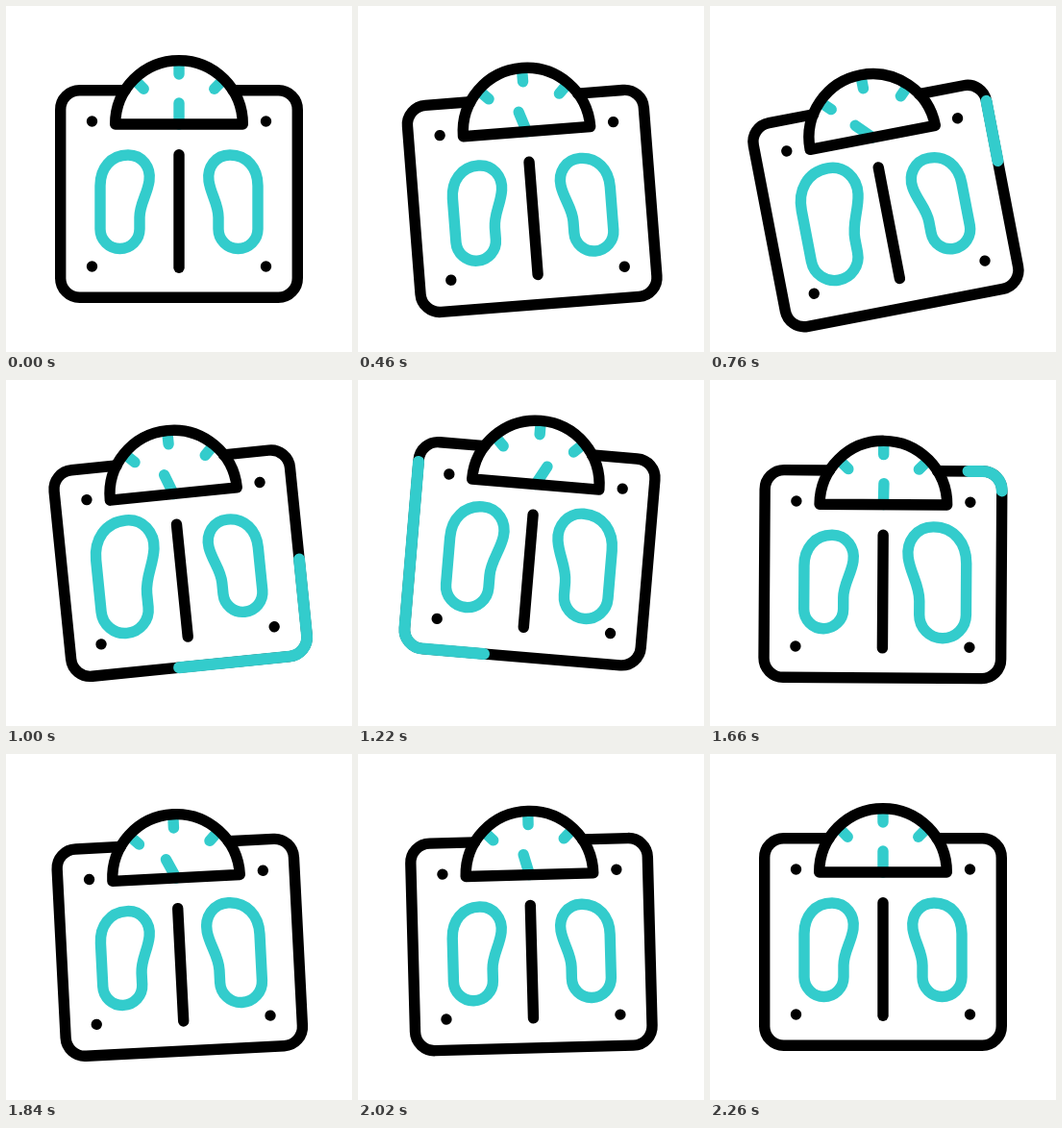
Animation of 360 by 360 pixels, one loop 2400 ms. Source, as an HTML page:

```html
<!DOCTYPE html>
<html lang="en">
<head>
<meta charset="utf-8">
<title>Bathroom scale</title>
<style>
  html, body { margin: 0; width: 100%; height: 100%; overflow: hidden; background: #fff; }
  svg { display: block; width: 100vw; height: 100vh; }
  path { fill: none; stroke: #000; stroke-width: 11.4; stroke-linecap: round; stroke-linejoin: round; }
  .teal { stroke: #3cc; }
  #left, #right { stroke-width: 11.4; }
  #foot { stroke: #3cc; stroke-width: inherit; }
  #sweep { stroke-width: 12; }
</style>
</head>
<body>
<svg viewBox="0 0 360 360">
  <defs>
    <path id="foot" d="M98 187C98 169 109 155 127 155C142 155 151 168 149 182C147 196 139 206 139 220V232A20.5 20.5 0 0 1 98 232Z"/>
    <path id="mark" class="teal" d="M180 63V71"/>
  </defs>
  <g id="scale">
    <use href="#mark"/>
    <use href="#mark" transform="rotate(-45 180 123)"/>
    <use href="#mark" transform="rotate(45 180 123)"/>
    <path class="teal" id="needle" d="M180 123V101"/>
    <path id="body"/>
    <path d="M113.7 123A66.3 66.3 0 0 1 246.3 123Z"/>
    <path d="M180 154.7V272.3"/>
    <path d="M89.5 120h0m181 0h0m0 151h0m-181 0h0"/>
    <g id="left"><use href="#foot"/></g>
    <g id="right"><use href="#foot" transform="translate(360 0) scale(-1 1)"/></g>
    <path class="teal" id="sweep"/>
  </g>
</svg>
<script>
  const LOOP = 2400, START = 200, END = 2250;
  const el = id => document.getElementById(id);
  const place = (id, value) => el(id).setAttribute("transform", value);

  // Smooth rise from 0 to 1 between two times.
  function ramp(t, from, to) {
    const p = Math.min(1, Math.max(0, (t - from) / (to - from)));
    return p * p * (3 - 2 * p);
  }

  // Sways out from rest through three peaks and back.
  function swing(t, times, peaks) {
    const stops = [START, ...times, END], values = [0, ...peaks, 0];
    return peaks.concat(0).reduce((sum, v, i) =>
      sum + (v - values[i]) * ramp(t, stops[i], stops[i + 1]), 0);
  }

  // Swells a foot, holds it, then lets it shrink again.
  function press(id, x, t, from) {
    const size = 1 + 0.2 * (ramp(t, from, from + 400) - ramp(t, from + 600, from + 1000));
    place(id, `translate(${x} 203.5) scale(${size}) translate(${-x} -203.5)`);
    el(id).style.strokeWidth = 11.4 / size;
  }

  // The silhouette runs clockwise from the upper right corner.
  const corner = (x, y) => `a20 20 0 0 1 ${x} ${y}`;
  const frame = `M303.3 108V283${corner(-20, 20.3)}H77${corner(-20.3, -20)}V108${corner(20.3, -20.3)}H124`;
  const rest = `H283${corner(20.3, 20.3)}`;
  el("body").setAttribute("d", `${frame}M236 87.7${rest}`);
  const sweep = el("sweep");
  sweep.setAttribute("d", `${frame}A66.3 66.3 0 0 1 236 87.7${rest}`);
  const total = sweep.getTotalLength();

  function draw(t) {
    const tilt = swing(t, [800, 1400, 1800], [-11, 9.1, -3]);
    const lift = swing(t, [700, 1200, 1700], [14, -14.8, 7]);
    const needle = swing(t, [800, 1400, 1840], [-45, 49, -26]);
    place("scale", `translate(0 ${lift}) rotate(${tilt} 180 180)`);
    place("needle", `rotate(${needle} 180 123)`);
    press("left", 123.5, t, 400);
    press("right", 236.5, t, 1000);

    const head = ramp(t, 600, 1600) * total, tail = ramp(t, 800, 1800) * total;
    sweep.style.display = head - tail > 0.01 ? "" : "none";
    sweep.style.strokeDasharray = `${head - tail} ${total * 2}`;
    sweep.style.strokeDashoffset = -tail;
  }

  const begin = performance.now();
  function tick() {
    draw((performance.now() - begin) % LOOP);
    requestAnimationFrame(tick);
  }
  tick();
</script>
</body>
</html>
```
